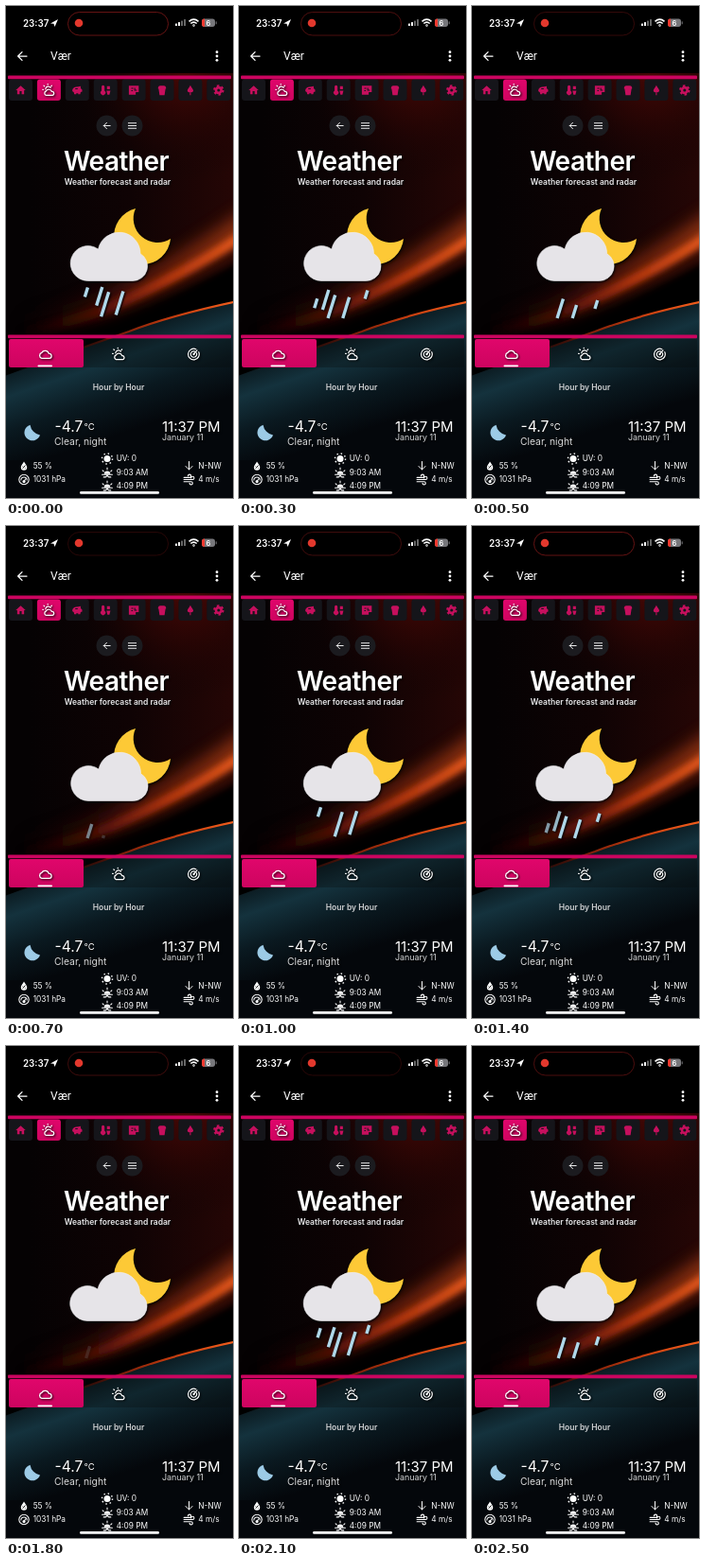
An HTML page for the animation above (2600 ms loop, 240x520 px).

```html
<!DOCTYPE html>
<html lang="en">
<head>
<meta charset="utf-8">
<title>Weather</title>
<style>
html, body { margin: 0; width: 100%; height: 100%; overflow: hidden; background: #000; }
svg { display: block; }
#stage { width: 240px; height: 520px; }
text { font-family: Inter, "Open Sans", sans-serif; fill: #fff; }
.b { font-weight: 600; }
.s { font-size: 8.3px; }
.ln { fill: none; stroke: currentColor; stroke-width: 2; stroke-linecap: round; stroke-linejoin: round; }
.fl { fill: currentColor; }
.w { color: #fff; }
.p { color: #c50f5d; }
.shade { filter: drop-shadow(1px 1px 1px #000); }
</style>
</head>
<body>
<svg id="stage" viewBox="0 0 240 520">
<defs>
  <filter id="blur1" x="-20%" y="-20%" width="140%" height="140%"><feGaussianBlur stdDeviation=".6"/></filter>
  <filter id="blur3" x="-20%" y="-50%" width="140%" height="200%"><feGaussianBlur stdDeviation="3"/></filter>
  <filter id="blur9" x="-20%" y="-50%" width="140%" height="200%"><feGaussianBlur stdDeviation="9"/></filter>
  <linearGradient id="red">
    <stop offset=".1" stop-color="#050203"/><stop offset=".55" stop-color="#0f0304"/><stop offset="1" stop-color="#250605"/>
  </linearGradient>
  <radialGradient id="glow" gradientUnits="userSpaceOnUse" cx="190" cy="65" r="120">
    <stop offset="0" stop-color="#4a0805"/><stop offset=".5" stop-color="#2a0504" stop-opacity=".7"/>
    <stop offset="1" stop-color="#100203" stop-opacity="0"/>
  </radialGradient>
  <linearGradient id="ember" gradientUnits="userSpaceOnUse" x1="240" y1="0" x2="10" y2="0">
    <stop offset="0" stop-color="#f25d1c"/><stop offset=".3" stop-color="#c03a0e"/>
    <stop offset=".6" stop-color="#5c1307"/><stop offset="1" stop-color="#1c0404" stop-opacity="0"/>
  </linearGradient>
  <linearGradient id="teal" gradientUnits="userSpaceOnUse" x1="140" y1="340" x2="172" y2="435">
    <stop offset="0" stop-color="#0b1a20"/><stop offset=".25" stop-color="#14323d"/>
    <stop offset=".6" stop-color="#0a1920"/><stop offset="1" stop-color="#04070b"/>
  </linearGradient>
  <linearGradient id="active" x1="0" y1="0" x2="0" y2="1">
    <stop offset="0" stop-color="#e0066b"/><stop offset="1" stop-color="#cd045f"/>
  </linearGradient>

  <symbol id="back" viewBox="0 0 24 24"><path class="ln" d="M20 12H5M12 5L5 12L12 19"/></symbol>
  <symbol id="menu" viewBox="0 0 24 24"><path class="ln" d="M3 6H21M3 12H21M3 18H21"/></symbol>
  <symbol id="home" viewBox="0 0 24 24"><path class="fl" d="M10 20V14H14V20H19V12H22L12 3L2 12H5V20Z"/></symbol>
  <symbol id="cloud" viewBox="0 0 24 24"><path class="ln" d="M6 19a5 5 0 0 1 0-9.500a6.500 6.500 0 0 1 12 1.500a4 4 0 0 1 1 8Z"/></symbol>
  <symbol id="partly" viewBox="0 0 24 24"><path class="ln" d="M7 21a4 4 0 0 1 0-7.500a5.500 5.500 0 0 1 10 1a3.200 3.200 0 0 1 1 6.500ZM6 10a5 5 0 0 1 9-2.500M10 1V2M3 4L4 5M17 4L16 5M1 11H2"/></symbol>
  <symbol id="pig" viewBox="0 0 24 24"><path class="fl" d="M2 12C3 7 8 5 14 5L19 4V8L22 11V15L19 16L18 20H14V18H10V20H6L5 16C3 15 2 14 2 12Z"/><path d="M8 9H13" stroke="#15151a" stroke-width="2"/></symbol>
  <symbol id="meter" viewBox="0 0 24 24"><path class="fl" d="M4 5a3 3 0 0 1 6 0V13a5 5 0 1 1-6 0ZM15 4H21V10H15ZM14 13H22L20 21H16Z"/></symbol>
  <symbol id="plan" viewBox="0 0 24 24"><path class="fl" d="M2 3H22V16H16V21H2Z"/><path d="M7 8H11M14 7V12H18M7 13H10M16 19H22" stroke="#15151a" stroke-width="2" fill="none"/></symbol>
  <symbol id="bin" viewBox="0 0 24 24"><path class="fl" d="M4 6Q5 3 8 3H16Q19 3 20 6V9H19L17 22H7L5 9H4Z"/></symbol>
  <symbol id="tree" viewBox="0 0 24 24"><path class="fl" d="M12 2C14 7 18 10 18 13A4 4 0 0 1 13 16V22H11V16A4 4 0 0 1 6 13C6 10 10 7 12 2Z"/></symbol>
  <symbol id="cog" viewBox="0 0 24 24"><g fill="none" stroke="currentColor"><circle cx="12" cy="12" r="5.500" stroke-width="5"/><circle cx="12" cy="12" r="9" stroke-width="4" stroke-dasharray="4.700 4.725"/></g></symbol>
  <symbol id="radar" viewBox="0 0 24 24"><path class="ln" d="M12 12L18 5M16 3A10 10 0 1 0 21 8M14 7A5.500 5.500 0 1 0 17 10"/><circle class="fl" cx="12" cy="12" r="2"/></symbol>
  <symbol id="drop" viewBox="0 0 24 24"><path class="fl" d="M12 2C15 7 19 11 19 15.500A7 7 0 0 1 5 15.500C5 11 9 7 12 2Z"/><path d="M9 18L15 11M9 12V13M15 17V18" stroke="#000" stroke-width="2"/></symbol>
  <symbol id="gauge" viewBox="0 0 24 24"><circle class="ln" cx="12" cy="12" r="10"/><path class="ln" d="M6 13A6 6 0 0 1 18 13M12 16L15 11"/><circle class="fl" cx="12" cy="16" r="3"/></symbol>
  <symbol id="sun" viewBox="0 0 24 24"><circle class="fl" cx="12" cy="12" r="6"/><circle cx="12" cy="12" r="9.500" fill="none" stroke="currentColor" stroke-width="2.500" stroke-dasharray="2.500 4.961"/></symbol>
  <symbol id="rise" viewBox="0 0 24 24"><path class="fl" d="M6 15a6 6 0 0 1 12 0Z"/><path class="ln" d="M2 16H22M5 21H9L12 18L15 21H19M12 3V6M3 8L5 10M21 8L19 10"/></symbol>
  <symbol id="down" viewBox="0 0 24 24"><path class="ln" d="M12 3V20M5 13L12 20L19 13"/></symbol>
  <symbol id="wind" viewBox="0 0 24 24"><path class="ln" d="M2 8H13A3 3 0 1 0 10 5M2 12H19A3 3 0 1 0 16 9M2 16H16A3 3 0 1 1 13 19"/></symbol>
</defs>

<!-- wallpaper -->
<rect width="240" height="520" fill="#04070b"/>
<rect y="70" width="240" height="290" fill="url(#red)"/>
<rect y="70" width="240" height="130" fill="url(#glow)"/>
<path d="M260 262Q195 300 110 332Q60 350 -20 360V400L260 330Z" fill="#050304" filter="url(#blur3)"/>
<g fill="none" stroke="url(#ember)">
  <path d="M260 226Q190 275 110 312Q60 332 -20 348" stroke-width="24" opacity=".5" filter="url(#blur9)"/>
  <path d="M260 236Q195 281 110 318Q60 338 -20 352" stroke-width="11" opacity=".85" filter="url(#blur3)"/>
</g>
<path d="M260 309Q180 325 130 344Q60 368 -20 398V480H260Z" fill="url(#teal)" filter="url(#blur1)"/>
<path d="M260 309Q180 325 130 344Q60 368 -20 398" fill="none" stroke="url(#ember)" stroke-width="2.200" filter="url(#blur1)"/>
<rect width="240" height="71"/>

<!-- status bar -->
<rect id="island" x="65.500" y="6.500" width="106" height="24.500" rx="12.250" stroke="#651313"/>
<circle cx="77" cy="18" r="4.300" fill="#e2382d"/>
<text class="b" x="18" y="21.500" font-size="9.800">23:37</text>
<path d="M47 18.500L55 14L51.500 22L50.500 18.800Z" fill="#fff"/>
<g fill="#fff"><rect x="179" y="18.500" width="2" height="2.500" rx=".5"/><rect x="182" y="17" width="2" height="4" rx=".5"/><rect x="185" y="15.500" width="2" height="5.500" rx=".5" opacity=".4"/><rect x="188" y="14" width="2" height="7" rx=".5" opacity=".4"/></g>
<g fill="none" stroke="#fff" stroke-width="1.600"><path d="M193.500 16.300Q198.500 11.800 203.500 16.300M195.300 18.500Q198.500 15.700 201.700 18.500"/><circle cx="198.500" cy="20.500" r=".4"/></g>
<rect x="207" y="13.500" width="14" height="8.500" rx="2.700" fill="#77777b"/>
<path d="M209.700 13.500H210V22H209.700A2.700 2.700 0 0 1 207 19.300V16.200A2.700 2.700 0 0 1 209.700 13.500Z" fill="#f0392f"/>
<rect x="221.700" y="16.300" width="1" height="3" rx=".5" fill="#77777b"/>
<text class="b" x="214" y="20.500" font-size="7.500" text-anchor="middle">6</text>

<!-- header -->
<use class="w" href="#back" x="9.500" y="45.500" width="15" height="15"/>
<text x="47" y="57" style="font:400 12px Roboto,sans-serif">Vær</text>
<g fill="#fff"><circle cx="223" cy="48.700" r="1.400"/><circle cx="223" cy="53" r="1.400"/><circle cx="223" cy="57.300" r="1.400"/></g>

<!-- navigation -->
<g id="tabs"></g>
<rect x="2" y="73.500" width="236" height="3.700" rx="1" fill="#cb045f"/>
<g fill="#1b1b1f"><circle cx="106.500" cy="126.500" r="11"/><circle cx="133.500" cy="126.500" r="11"/></g>
<use class="w" href="#back" x="101" y="121" width="11" height="11"/>
<use class="w" href="#menu" x="128" y="121" width="11" height="11"/>

<g class="shade" text-anchor="middle">
  <text class="b" x="116.500" y="173.500" font-size="28" letter-spacing="-.55">Weather</text>
  <text class="b" x="118" y="188.800" font-size="8.500" style="fill:#e8e8ea">Weather forecast and radar</text>
</g>

<!-- weather picture -->
<g class="shade">
  <path d="M137 214A30 30 0 1 0 174 246A25.500 25.500 0 0 1 137 214Z" fill="#fdc936"/>
  <g id="rain" stroke="#b0d8ea" stroke-width="3.400"></g>
  <path id="puffy" fill="#e6e4e8" stroke="#f1f0f3" stroke-width=".6" d="M86.500 290.500A18.500 18.500 0 1 1 97.500 257A22.500 22.500 0 0 1 142 261.700A15.500 15.500 0 0 1 134 290.500Z"/>
</g>

<!-- forecast tabs -->
<rect x="2" y="352" width="236" height="30" rx="2" fill="#080a0d" opacity=".3"/>
<rect x="3" y="352" width="79" height="30" rx="2" fill="url(#active)"/>
<rect x="2" y="347.500" width="236" height="3.700" rx="1" fill="#cb045f"/>
<rect x="33.500" y="379.500" width="15.500" height="1.700" rx=".8" fill="#fff"/>
<g class="w shade">
  <use href="#cloud" x="34" y="360.500" width="15" height="15"/>
  <use href="#partly" x="112" y="360.500" width="15" height="15"/>
  <use href="#radar" x="191.500" y="361" width="14" height="14"/>
</g>
<text class="b" x="119" y="405.800" font-size="8.500" text-anchor="middle" style="fill:#cfd0d2">Hour by Hour</text>

<!-- current conditions -->
<path d="M25.500 442.700A8.500 8.500 0 1 0 36 453.500A13 13 0 0 1 25.500 442.700Z" fill="#9ccbe6"/>
<g class="shade">
  <text x="51.500" y="449.500" font-size="15.600">-4.7</text>
  <text x="82.500" y="447.500" font-size="9.500">°C</text>
  <text x="51" y="463.700" font-size="10.300" style="fill:#d8d9da">Clear, night</text>
  <text x="165" y="449.500" font-size="15">11:37 PM</text>
  <text x="165" y="459.300" font-size="8.900" style="fill:#d8d9da">January 11</text>
</g>
<g id="facts" class="w"></g>
<rect x="78" y="513" width="84" height="2.800" rx="1.400" fill="#fff"/>
</svg>

<script>
const $ = id => document.getElementById(id);
const icon = (name, x, y, size, cls = '') =>
  `<use class="${cls}" href="#${name}" x="${x - size / 2}" y="${y - size / 2}" width="${size}" height="${size}"/>`;

$('tabs').innerHTML = ['home', 'partly', 'pig', 'meter', 'plan', 'bin', 'tree', 'cog'].map((name, i) => {
  const x = 15.5 + i * 29.9, on = i === 1;
  return `<rect x="${x - 12.5}" y="77.500" width="25" height="22.500" rx="3" fill="${on ? 'url(#active)' : '#15151a'}"/>`
    + icon(name, x, 89, on ? 14.5 : 12.5, on ? 'w shade' : 'p');
}).join('');

// icon, text, icon centre x and y, icon size
$('facts').innerHTML = [
  ['drop', '55 %', 19, 486, 11], ['gauge', '1031 hPa', 19, 500.5, 12.5],
  ['sun', 'UV: 0', 107, 478.5, 14], ['rise', '9:03 AM', 107, 493, 13], ['rise', '4:09 PM', 107, 507, 13],
  ['down', 'N-NW', 193.5, 486, 12], ['wind', '4 m/s', 193.5, 500.5, 13]
].map(([name, label, x, y, size]) =>
  icon(name, x, y, size) + `<text class="s" x="${x + 9.7}" y="${y + 2.8}">${label}</text>`).join('');

const LOOP = 2600, STEP = 100, CYCLE = 1030, LEAD = 40, GROW = 30, SLANT = .31, MIDDLE = 315, FLOOR = 330;
// x at MIDDLE height, first top, fall, length, birth, death, leftward drift per ms
const drops = [
  [81, 297, 22, 10, -40, 470, 0],
  [97, 297, 6, 21, 12, 475, .02],
  [105.5, 302, 16, 26, -80, 830, .02],
  [120.5, 301, 28, 25, -80, 770, .018],
  [131.5, 295, 30, 9, 50, 720, 0]
];

function streak([x, first, fall, length, birth, death, drift], t) {
  const age = (t + LEAD - birth + CYCLE) % CYCLE, u = age / (death - birth);
  if (u >= 1) return '';
  const top = first + fall * u * u;
  const end = Math.min(FLOOR, top + length * Math.min(1, age / GROW));
  const at = y => x - drift * (birth + age) - (y - MIDDLE) * SLANT;
  return `<path d="M${at(top)} ${top}L${at(end)} ${end}" opacity="${Math.min(1, 6 * (1 - u))}"/>`;
}

function draw(now) {
  const t = Math.floor(now % LOOP / STEP) * STEP;
  $('rain').innerHTML = drops.map(d => streak(d, t)).join('');
  const sway = .6 * Math.sin(2 * Math.PI * t / 2100);
  $('puffy').setAttribute('transform', `translate(${sway} 0)`);
  $('island').setAttribute('stroke-opacity', .7 + .3 * Math.cos(2 * Math.PI * t / 1400));
}

const start = performance.now();
function tick() {
  draw(performance.now() - start);
  requestAnimationFrame(tick);
}
tick();
</script>
</body>
</html>
```
